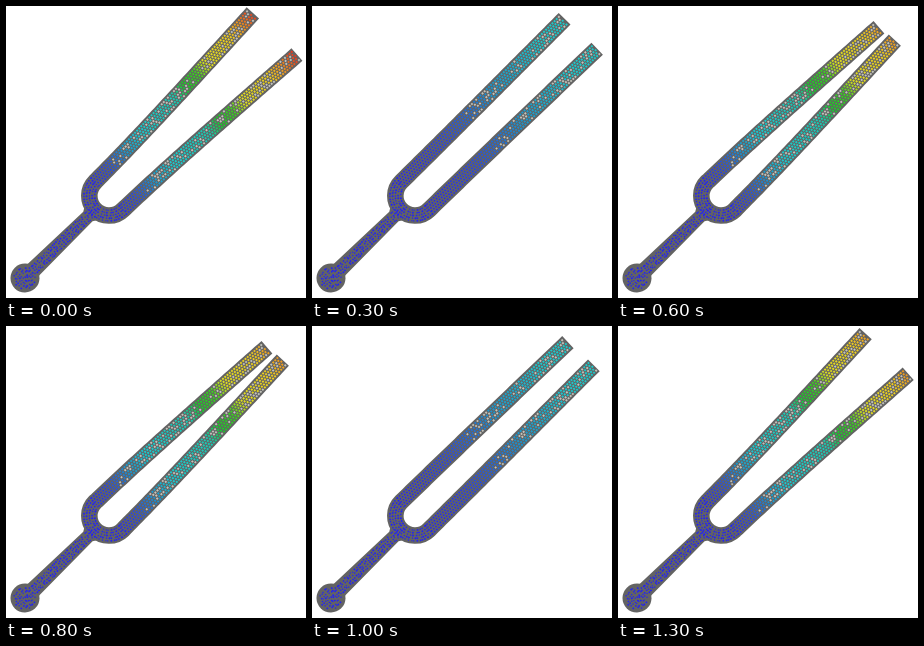
Write an HTML page with a canvas that moves like this. It is 300x292 px and loops after 1.4 s.

```html
<!DOCTYPE html>
<html lang="en">
<head>
<meta charset="utf-8">
<title>Tuning fork vibration</title>
<style>
html, body { margin: 0; width: 100%; height: 100%; overflow: hidden; background: #fff; }
canvas { display: block; width: 300px; height: 292px; }
</style>
</head>
<body>
<canvas id="stage" width="300" height="292"></canvas>
<script>
const ctx = document.getElementById('stage').getContext('2d');
const LOOP = 1400, STEP = 100;
const GREY = '#636363', PALE = '#c4c4bc';

// Fork space: u runs along the axis from the ball, v across it.
const YOKE = 117.5, ROOT = 98, TIP = 349.5;
const GAP = 19.7, WIDTH = 16.6, SWING = 10.6;

// Strain level and its colour.
const HEAT = [
  [0, 35, 35, 245], [0.04, 35, 70, 235], [0.1, 25, 150, 210],
  [0.18, 25, 205, 210], [0.4, 25, 205, 180], [0.47, 25, 205, 40],
  [0.56, 60, 210, 30], [0.63, 225, 225, 30], [0.82, 240, 205, 30],
  [0.9, 240, 150, 30], [1, 235, 50, 30]
];

function heat(x) {
  const i = Math.max(1, HEAT.findIndex(stop => stop[0] >= x));
  const a = HEAT[i - 1], b = HEAT[i];
  const k = (x - a[0]) / (b[0] - a[0]);
  const mix = n => Math.round(a[n] + (b[n] - a[n]) * k);
  return `rgb(${mix(1)},${mix(2)},${mix(3)})`;
}

// Deflection of a clamped beam, 1 at the tip.
function bend(u) {
  const s = Math.min(1, Math.max(0, (u - ROOT) / (TIP - ROOT)));
  return s * s * (6 - 4 * s + s * s) / 3;
}

function slope(u) {
  return (bend(u + 1) - bend(u - 1)) / 2;
}

function seeded(seed) {
  return () => {
    seed = (seed * 16807) % 2147483647;
    return seed / 2147483647;
  };
}

function dot(u, v, size, color) {
  ctx.fillStyle = color;
  ctx.fillRect(u - size / 2, v - size / 2, size, size);
}

function handleHalf(u) {
  return 8.4 - u * 0.02;
}

// The lower prong reaches a little further.
function tineEnd(side) {
  return TIP + side * 1.2;
}

function tineCentre(u, side, c) {
  return side * (GAP + SWING * bend(u) * c);
}

function strokeProngs(c) {
  ctx.beginPath();
  ctx.moveTo(tineEnd(-1), tineCentre(TIP, -1, c));
  for (let u = TIP - 6; u > YOKE; u -= 4) ctx.lineTo(u, tineCentre(u, -1, c));
  ctx.arc(YOKE, 0, GAP, -Math.PI / 2, Math.PI / 2, true);
  for (let u = YOKE + 4; u < TIP - 4; u += 4) ctx.lineTo(u, tineCentre(u, 1, c));
  ctx.lineTo(tineEnd(1), tineCentre(TIP, 1, c));
  ctx.lineWidth = WIDTH;
  ctx.lineJoin = 'round';
  ctx.stroke();
}

function drawBody(c) {
  ctx.fillStyle = ctx.strokeStyle = GREY;
  ctx.beginPath();
  ctx.arc(0, 0, 14.5, 0, 2 * Math.PI);
  ctx.fill();
  ctx.beginPath();
  for (const u of [8, 88]) ctx.lineTo(u, -handleHalf(u));
  ctx.lineTo(95, -11);
  ctx.lineTo(95, 11);
  for (const u of [88, 8]) ctx.lineTo(u, handleHalf(u));
  ctx.fill();
  strokeProngs(c);
}

function drawStem() {
  const rnd = seeded(71);
  const blue = heat(0);
  for (let u = -12; u < 96; u += 2.7) {
    for (let v = -12; v <= 12; v += 2.7) {
      const x = u + (rnd() - 0.5) * 1.8, y = v + (rnd() - 0.5) * 1.8;
      const size = 1.1 + rnd() * 0.7;
      const inBall = Math.hypot(x, y) < 11.5;
      const inHandle = x > 8 && Math.abs(y) < handleHalf(x) - 2.2;
      if (inBall || inHandle) dot(x, y, size, blue);
    }
  }
}

function drawYoke() {
  const rnd = seeded(29);
  const blue = heat(0);
  for (let r = GAP - 5.4; r <= GAP + 5.5; r += 2.7) {
    const turn = 2.9 / r;
    for (let a = Math.PI / 2; a < Math.PI * 1.5; a += turn) {
      const b = a + (rnd() - 0.5) * turn * 0.6;
      dot(YOKE + r * Math.cos(b), r * Math.sin(b), 1.1 + rnd() * 0.7, blue);
    }
  }
}

function drawTine(side, c) {
  const rnd = seeded(50 + side);
  for (let row = -2; row <= 2; row++) {
    const w = row * 2.7;
    for (let u = YOKE + (row & 1 ? 1.5 : 0); u < tineEnd(side) - 2; u += 3) {
      const level = bend(u) * Math.abs(c);
      const tilt = side * SWING * c * slope(u);
      const size = 1.5 + 0.4 * Math.min(1, level / 0.1);
      const pale = rnd() < 0.2 && level > 0.06;
      dot(u - w * tilt, tineCentre(u, side, c) + w, size, pale ? PALE : heat(level));
    }
  }
}

function draw(time) {
  const t = Math.floor((time % LOOP) / STEP) * STEP;
  const c = Math.cos(2 * Math.PI * t / LOOP);
  ctx.setTransform(1, 0, 0, 1, 0, 0);
  ctx.fillStyle = '#fff';
  ctx.fillRect(0, 0, 300, 292);
  ctx.setTransform(0.715, -0.699, 0.699, 0.715, 19, 272);
  drawBody(c);
  drawStem();
  drawYoke();
  drawTine(-1, c);
  drawTine(1, c);
}

const start = performance.now();
function tick() {
  draw(performance.now() - start);
  requestAnimationFrame(tick);
}
tick();
</script>
</body>
</html>
```
